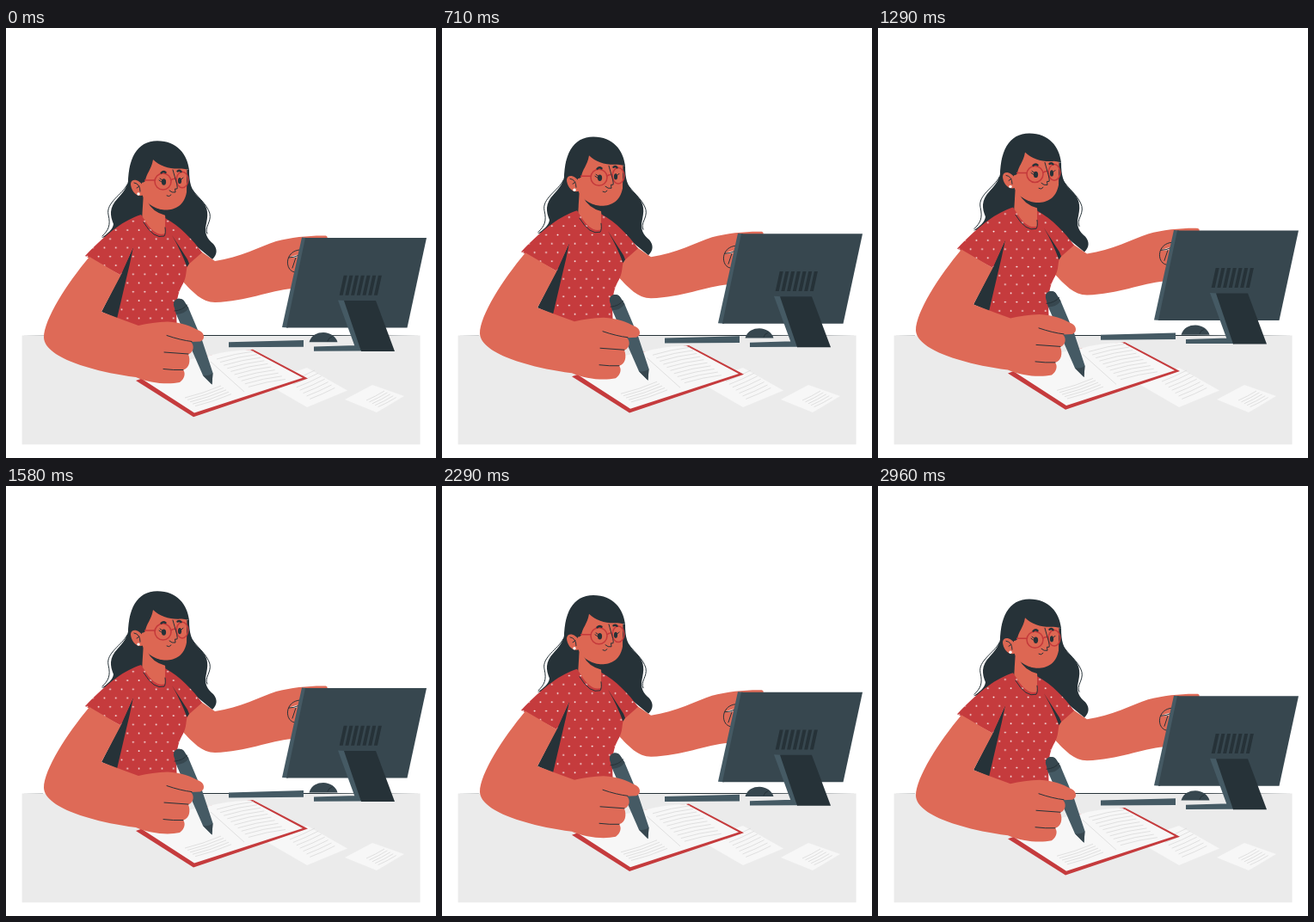
An HTML page for the animation above (3 s loop, 500 px wide and 500 px high).

```html
<!DOCTYPE html>
<html lang="en">
<head>
<meta charset="utf-8">
<title>At the desk</title>
<style>
html, body { margin: 0; width: 100%; height: 100%; overflow: hidden; background: #fff; }
svg { display: block; width: 100%; height: 100%; }
.ink { fill: #263238; }
.steel { fill: #455a64; }
.slate { fill: #37474f; }
.skin { fill: #de6a57; }
.face { fill: #dd6753; }
.red { fill: #c53b3d; }
.paper { fill: #f7f7f7; }
.line { fill: none; stroke: #263238; stroke-width: 1; stroke-linecap: round; stroke-linejoin: round; }
.bold { stroke-width: 2.4; }
.rim { fill: none; stroke: #c4393b; stroke-width: 1.5; }
.text { fill: none; stroke: #dadada; stroke-width: .8; }
</style>
</head>
<body>
<svg viewBox="0 0 500 500">
  <defs>
    <pattern id="dots" width="13.4" height="20.5" patternUnits="userSpaceOnUse" patternTransform="translate(164.6 271)">
      <circle cx="3.4" cy="5" r=".95" fill="#fff"/>
      <circle cx="10.1" cy="15.25" r=".95" fill="#fff"/>
    </pattern>
    <path id="shirt" d="M157 217C137 224 121 235 92 265L133.500 287.500L148 255Q144 275 139.500 293L129 338C140 344 150 348 165 348L199 348C197 320 199 309 206 297C210 289 209 283 211 276L228 261C217 246 203 231 185 221L185 239Q173 243 161 223Z"/>
  </defs>

  <rect x="18.600" y="357.500" width="463" height="126.800" fill="#ebebeb"/>
  <path class="ink" d="M18.600 357.500L134 357L250 356.900L366 357L481.600 357.500L366 358L250 358.100L134 358Z"/>
  <path class="paper" d="M350 395L397 421.500L350 441L300 412Z"/>
  <path class="paper" d="M426 415L463 428L431 447L394 432Z"/>
  <path id="notes" class="text"/>

  <g id="lift">
    <!-- hair behind -->
    <path class="ink" d="M144 160C144 182 139 188 130 198C119.500 209 121 218 125 228C124 235 118 239 111 244L160 235L190 228L240 269C246 263 246 257 241 251C234 245 230 239 233 227C236 214 234 206 224 197C215 188 213 180 213 165Z"/>
    <path class="line" d="M141 182C135 194 116 203 119 217C122 230 119 235 112 242M214 184C220 195 234 204 237 216C239 226 230 232 234 239"/>

    <!-- reaching arm -->
    <path class="skin" d="M227 260Q237 267 243 271C272 267 296 254 314 248C332 243 356 241 372 241.500Q376 243 371 247L350 300L333 303C306 305 280 318 243 319C228 319 217 307 205 294L210 275Z"/>
    <path d="M331 266L339 263.500L338 267H330Z" fill="#f6e4df"/>
    <path class="line" d="M341 258C323 260 324 284 337 284M329 267Q335 267 341 264M337 267L333 279"/>

    <!-- monitor, keyboard, mouse -->
    <path class="steel" d="M344 243.500L350 244L328 348.500L321 348Z"/>
    <path class="slate" d="M348 244H489L466.500 348.500H326Z"/>
    <path id="vents" class="ink"/>
    <path class="steel" d="M358 370.500L407 369L414 375.500L358 375.700ZM386 316.500L394 317L414 376L407 374Z"/>
    <path class="ink" d="M393 317H430L452 376H413Z"/>
    <path class="steel" d="M259 365.300L346 363V370.700L259 371.300Z"/>
    <path class="slate" d="M352.500 365.300C355 357 362 354 369 354C377 354 384 359 385.500 365.300Z"/>
    <path class="line" stroke-width=".7" d="M374 364Q375 360 379 359"/>

    <!-- notebook -->
    <path class="red" d="M151 410L218 452.300L351 407.500L287 373.800L230 382Z"/>
    <path class="paper" d="M158 408L219 447.500L345 406.800L284 374.300Q257 375 236 381L190 390Z"/>
    <path d="M238 388L277 423" fill="none" stroke="#e0e0e0" stroke-width="1"/>
    <path id="writing" class="text"/>

    <!-- body -->
    <path class="ink" d="M149 252L133 287L111 330L132 339L142 290Z"/>
    <path class="face" d="M160 190L184 205L187 243Q172 248 158 224Z"/>
    <use href="#shirt" class="red"/>
    <use href="#shirt" fill="url(#dots)"/>
    <path class="ink" d="M193 241L211 269L213 274L210.500 278Q204 260 193 241Z"/>
    <path class="ink" d="M164 201Q173 211 186 211L185.500 218Q170 214 164 201Z"/>
    <path class="line" stroke-width=".8" d="M160 226Q172 246 184 242Q186 239 185 232"/>

    <!-- head -->
    <path class="face" d="M158 160L170 150H208L210.500 160L210 191C207 207 196 212 184 211.500C170 210 161 202 158 193Z"/>
    <path class="ink" d="M142 187C141 152 152 131.200 176 131.200C199 131.200 211 147 213 165Q206 163 203 163.500C190 164 179 161 171 153C169 165 163 169 162 178Q158 182 151 178L146 185Z"/>
    <path class="face" d="M160 194C152 198 145 189 145 181C146 174 155 176 160 184Z"/>
    <path class="line" d="M149 180Q156 181 156 190M152 186L155 184"/>
    <circle cx="154" cy="193" r="1.700" fill="#fff"/>
    <path class="rim" d="M161 177H173M192 177Q195 174 198 176"/>
    <circle class="rim" cx="182.500" cy="178.500" r="9.500"/>
    <ellipse class="rim" cx="205" cy="176.500" rx="6.800" ry="9.300"/>
    <ellipse class="ink" cx="183.500" cy="179" rx="2.600" ry="3.700"/>
    <ellipse class="ink" cx="202" cy="177.500" rx="2.100" ry="3.600"/>
    <path class="line" d="M178 177L181 179M179 175L182 177M204 176L206 174M194 165C197 176 200 184 199 187H196.500L197 191Q193 192 190 189M187 195Q190 197 192 194"/>
    <path class="line bold" d="M180.500 168.500Q183 166 185.500 168M199.500 166.500Q202 165 203.500 167"/>

    <!-- pen -->
    <path class="steel" d="M195 322C194 314 205 312 208 319L212 325L228 363L240.500 401L239.500 414.500L229 404L198 333Z"/>
    <path class="slate" d="M229 404Q236 405 240.500 401L239.500 414.500ZM195 322C194 314 205 312 208 319L212.500 326Q207 333 198 333Z"/>
    <path class="line" d="M196 329Q206 328 210.500 322"/>

    <!-- writing arm -->
    <path class="skin" d="M97 266C71 297 44 339 44 360C45 385 110 401 151 406C167 413 188 415 202 412C208 408 209 401 206 397.500C213 396 215 387 212 379.500C219 377 219 368 215 365L226 364.500C232 362 231 355 225 352C215 347 204 342 188 341.500Q170 342 154 346Q132 338 111 330L133.500 287.500Z"/>
    <path class="line" d="M187 357.500Q203 363 216 364.500M184 377Q198 378 212 379M183 396.500Q195 398 206 397.500"/>
  </g>
</svg>
<script>
const LOOP = 3000, RISE = 10;
const LEAD = 40;     // the loop opens just after the lowest point
const REST_Y = 0.27; // offset of the drawing at the lowest point
const byId = id => document.getElementById(id);
const repeat = (count, draw) => Array.from({ length: count }, (_, i) => draw(i)).join("");

// Evenly spaced curved strokes, each shifted by (dx, dy)
const rows = (count, x, y, dx, dy, w, h, bend) => repeat(count, i =>
  `M${x + i * dx} ${y + i * dy}q${w / 2} ${h / 2 + bend} ${w} ${h}`);

byId("vents").setAttribute("d", repeat(7, i => `M${392.7 + i * 6.7} 287.7h4l-5 23h-4z`));
byId("notes").setAttribute("d",
  rows(7, 330, 411, 3.9, 3.4, 29, -13, 1) + rows(5, 419, 433, 3.4, 1.9, 21, -11, 1));
byId("writing").setAttribute("d",
  rows(10, 245, 385, 4.1, 3.6, 43, -9, -2) + rows(5, 208, 430, 3, 2.4, 42, -14, 2));

const lift = byId("lift");
function render(time) {
  const phase = (time + LEAD) % LOOP / LOOP;
  const rise = RISE * (1 - Math.abs(1 - 2 * phase));
  lift.setAttribute("transform", `translate(0 ${REST_Y - rise})`);
}

const start = performance.now();
function tick(now) {
  render(Math.max(0, now - start));
  requestAnimationFrame(tick);
}
render(0);
requestAnimationFrame(tick);
</script>
</body>
</html>
```
